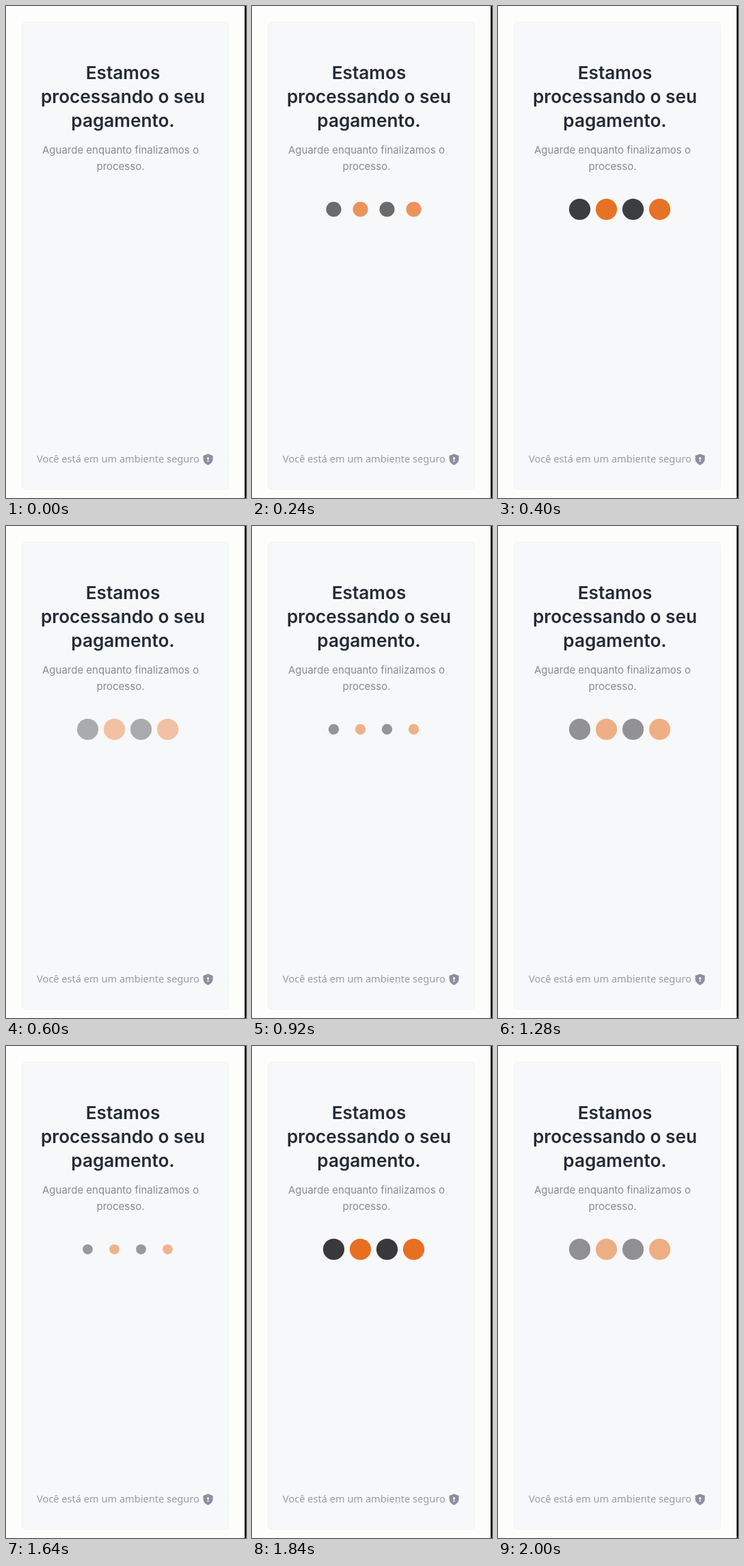
An HTML page that plays this animation: 351x720 px, repeating every 2040 ms.

```html
<!DOCTYPE html>
<html lang="pt">
<head>
<meta charset="utf-8">
<style>
  html, body { margin: 0; width: 100%; height: 100%; overflow: hidden; background: #fdfefc; }
  svg { display: block; }
  .title { font: 600 26.2px Inter, "Open Sans", sans-serif; fill: #242b38; }
  .note { font: 400 15px Inter, "Open Sans", sans-serif; fill: #868c92; }
  .footer { font: 400 14.6px "Noto Sans", "Open Sans", sans-serif; fill: #979ca6; }
</style>
</head>
<body>
<svg width="351" height="720" viewBox="0 0 351 720">
  <rect width="351" height="720" fill="#fdfefc"/>
  <rect x="23.5" y="23.5" width="302" height="684" rx="6" fill="#f7f8f9" stroke="#edf4ee"/>
  <rect x="349" width="2" height="720" fill="#000"/>
  <g class="title" text-anchor="middle">
    <text x="171" y="107">Estamos</text>
    <text x="171" y="142">processando o seu</text>
    <text x="171" y="177">pagamento.</text>
  </g>
  <g class="note" text-anchor="middle">
    <text x="167.5" y="216">Aguarde enquanto finalizamos o</text>
    <text x="167.5" y="239.5">processo.</text>
  </g>
  <g id="dots"></g>
  <text class="footer" x="45" y="668">Você está em um ambiente seguro</text>
  <path d="M295.5 655.5 L302.5 658 V663 Q302.5 668.5 295.5 672 Q288.5 668.5 288.5 663 V658 Z" fill="#8990a0"/>
  <circle cx="295.5" cy="662" r="1.7" fill="#f2f3f5"/>
  <path d="M295.5 662 L296.6 667 H294.4 Z" fill="#f2f3f5"/>
</svg>
<script>
  const LOOP = 2040, PERIOD = 724, DELAY = 16, RADIUS = 15.6;
  const COLORS = ['#313133', '#e66a18'];
  const group = document.getElementById('dots');

  const dots = [0, 1, 2, 3].map(i => {
    const dot = document.createElementNS('http://www.w3.org/2000/svg', 'circle');
    dot.setAttribute('cx', 119.5 + 39 * i);
    dot.setAttribute('cy', 297.5);
    dot.setAttribute('fill', COLORS[i % 2]);
    return group.appendChild(dot);
  });

  const easeInOut = u => u < 0.5 ? 2 * u * u : 1 - 2 * (1 - u) ** 2;

  // Each pulse grows while appearing, then fades at full size.
  function draw(time) {
    const phase = Math.max(0, time - DELAY) % PERIOD / (PERIOD / 2);
    const scale = easeInOut(Math.min(phase, 1));
    const opacity = phase < 1 ? scale : 2 - phase;
    for (const dot of dots) dot.setAttribute('r', RADIUS * scale);
    group.setAttribute('fill-opacity', opacity);
  }

  const start = performance.now();
  function tick() {
    const time = (performance.now() - start) % LOOP;
    draw(Math.floor(time / 40) * 40);
    requestAnimationFrame(tick);
  }
  tick();
</script>
</body>
</html>
```
